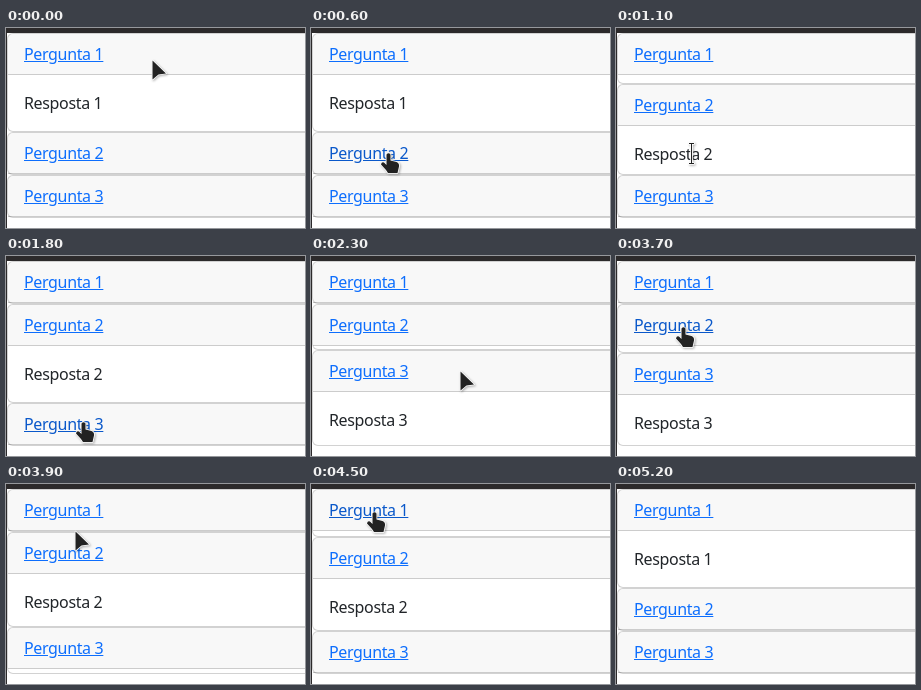
An HTML page that plays this animation: 299 by 200 pixels, repeating every 5600 ms.

```html
<!DOCTYPE html>
<html lang="pt">
<head>
<meta charset="utf-8">
<style>
  * { box-sizing: border-box; }
  html, body { margin: 0; width: 100%; height: 100%; overflow: hidden; background: #fff; }
  body { position: relative; font: 16px/24px "Noto Sans", "Open Sans", sans-serif; letter-spacing: -.35px; color: #212529; }
  #frame { position: absolute; inset: 0; border: solid #2c2a2b; border-width: 5px 0 0 1px; overflow: hidden; }
  .card { width: 330px; border: 1px solid rgba(0,0,0,.175); border-radius: 6px; background: #fff; }
  .head { height: 41px; padding: 8px 16px; border-bottom: 1px solid rgba(0,0,0,.175); border-radius: 5px 5px 0 0; background: rgba(33,37,41,.03); }
  .link { color: #0d6efd; text-decoration: underline; }
  .link.hover { color: #0a58ca; }
  .body { overflow: hidden; }
  .body div { padding: 16px; }
  svg { position: absolute; left: 0; top: 0; width: 100%; height: 100%; }
  #cursor { fill: #222; stroke: #fff; stroke-width: 1.6; stroke-linejoin: round; paint-order: stroke; filter: drop-shadow(1px 1px 1px rgba(0,0,0,.3)); }
</style>
</head>
<body>
<div id="frame"></div>
<svg><path id="cursor"/></svg>
<script>
const LOOP = 5600, STEP = 100, SLIDE = 350;
const TOP = 5, CARD = 43, BODY = 56;

const clicks = [
  { at: 903, card: 1 }, { at: 2052, card: 2 }, { at: 3663, card: 1 }, { at: 4465, card: 0 }
];

// Pointer trips: start, end, destination, sideways bow
const home = [146, 31];
const trips = [
  [50, 600, 76, 125, 0],
  [1200, 1500, 82, 179, 0],
  [1700, 1800, 76, 166, 0],
  [2150, 2750, 74, 30, 79],
  [3000, 3100, 64, 75, 0],
  [3100, 3200, 66, 84, 0],
  [3300, 3500, 66, 71, 0],
  [3760, 4110, 62, 28, 6],
  [4600, 4900, 32, -19, 0],
  [5100, 5200, 32, -40, 0]
];

const shapes = {
  arrow: "M.5 1.5V20.5L6.5 15.5 14 14.5Z",
  hand: "M-.5 1.5Q1.5-1 3.5 1.5V7.5L9.500 9Q12.500 10 12 13.500L10.500 20H1L-1 17-6 11.500Q-5.500 8.500-3 9.500L-.5 12Z",
  beam: "M-3-10H2V-9H0V10H2V11H-3V10H-1V-9H-3Z"
};

const frame = document.getElementById("frame");
const cursor = document.getElementById("cursor");
frame.innerHTML = [1, 2, 3].map(n => `<div class="card">
  <div class="head"><span class="link">Pergunta ${n}</span></div>
  <div class="body"><div>Resposta ${n}</div></div></div>`).join("");
const links = [...document.querySelectorAll(".link")];
const bodies = [...document.querySelectorAll(".body")];

// CSS "ease", solved by bisection
function ease(x) {
  if (x >= 1) return 1;
  let lo = 0, hi = 1, s;
  for (let i = 0; i < 24; i++) {
    s = (lo + hi) / 2;
    if (.75 * s * (1 - s) + s ** 3 < x) lo = s; else hi = s;
  }
  return .3 * s * (1 - s) ** 2 + 3 * s * s * (1 - s) + s ** 3;
}

function bodyHeights(t) {
  let heights = [BODY, 0, 0], open = 0;
  for (const { at, card } of clicks) {
    if (t < at) break;
    heights = [0, 0, 0];
    heights[card] = Math.round(BODY * ease((t - at) / SLIDE));
    heights[open] = BODY - heights[card];
    open = card;
  }
  return heights;
}

function pointerAt(t) {
  let [x, y] = home;
  for (const [start, end, toX, toY, bow] of trips) {
    if (t <= start) break;
    const p = Math.sin(Math.PI / 2 * Math.min(1, (t - start) / (end - start)));
    x += (toX - x) * p + bow * Math.sin(Math.PI * p);
    y += (toY - y) * p;
  }
  return [Math.round(x), Math.round(y)];
}

function draw(t) {
  const [x, y] = pointerAt(t);
  const over = mid => x > 17 && x < 98 && Math.abs(y - mid) <= 10;
  let shape = "arrow", top = TOP;
  bodyHeights(t).forEach((h, i) => {
    bodies[i].style.height = h + "px";
    const hover = over(top + 21);
    links[i].classList.toggle("hover", hover);
    if (hover) shape = "hand";
    else if (h > 40 && over(top + 70)) shape = "beam";
    top += CARD + h;
  });
  cursor.setAttribute("d", shapes[shape]);
  cursor.setAttribute("transform", `translate(${x} ${y})`);
}

const origin = performance.now();
function tick() {
  const t = (performance.now() - origin) % LOOP;
  draw(Math.floor(t / STEP) * STEP);
  requestAnimationFrame(tick);
}
tick();
</script>
</body>
</html>
```
